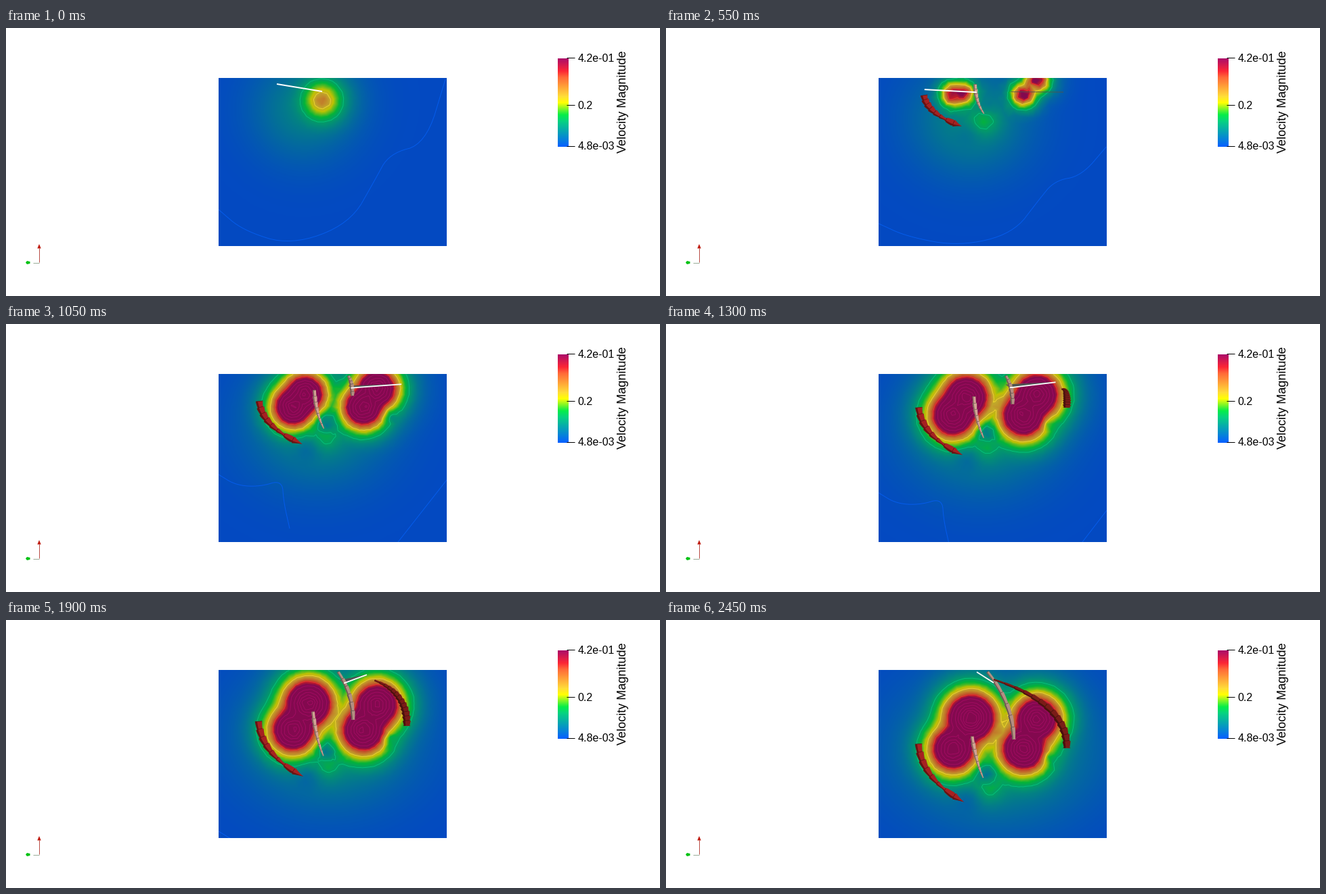
Recreate the animation shown at these times as a matplotlib script. Size 966 by 397 pixels, loop 2.5 s.

```python
import numpy as np
import matplotlib.pyplot as plt
from matplotlib.animation import FuncAnimation
from matplotlib.colors import LinearSegmentedColormap
from matplotlib.patches import Polygon, Rectangle
from matplotlib.tri import Triangulation

W, H, DPI = 966, 397, 100
TICK_MS, STEP_MS, TICKS = 50, 84.4, 50
PX = 72 / DPI
X0, X1, Y0, Y1 = 314, 651, 74, 323

STOPS = [
    (0, .02, .38, 1), (.29, .02, .83, .5), (.36, .02, .93, .29), (.5, 1, 1, .01),
    (.57, 1, .87, .22), (.79, 1, .41, .22), (.86, .99, .15, .21), (1, .68, .05, .41),
]


def rainbow(gain):
    colors = [(p, (r * gain, g * gain, b * gain)) for p, r, g, b in STOPS]
    return LinearSegmentedColormap.from_list("rainbow", colors, 512)


BRIGHT, DIM = rainbow(1), rainbow(.76)
LEVELS = .28 * np.arange(1, 13)

# The faint lowest contour: early shape at its start and end, and late shape.
LOW_START = np.array([(314, 269), (350, 300), (421, 322), (508, 290), (545, 225),
                      (566, 186), (620, 172), (649, 76)])
LOW_END = np.array([(314, 300), (360, 314), (440, 324), (515, 312), (553, 270),
                    (578, 246), (610, 243), (651, 226)])
LOW_LATE = np.array([(314, 250), (340, 266), (375, 268), (408, 258), (410, 290), (419, 330)])


def ease(u):
    u = np.clip(u, 0, 1)
    return u * u * (3 - 2 * u)


# A coarse jittered mesh gives the angular contours.
rng = np.random.default_rng(4)
mx, my = np.meshgrid(np.arange(X0 - 24, X1 + 25, 10.0), np.arange(Y0 - 24, Y1 + 25, 9.0))
mx[1::2] += 5
mx, my = (m.ravel() + rng.uniform(-2.5, 2.5, m.size) for m in (mx, my))
mesh = Triangulation(mx, my)
gx, gy = np.meshgrid(np.arange(X0, X1) + .5, np.arange(Y0, Y1) + .5)
corners = mesh.triangles[mesh.get_trifinder()(gx, gy)]
(xa, xb, xc), (ya, yb, yc) = (np.moveaxis(m[corners], -1, 0) for m in (mx, my))
area = (yb - yc) * (xa - xc) + (xc - xb) * (ya - yc)
wa = ((yb - yc) * (gx - xc) + (xc - xb) * (gy - yc)) / area
wb = ((yc - ya) * (gx - xc) + (xa - xc) * (gy - yc)) / area
weights = np.stack([wa, wb, 1 - wa - wb], -1)


def gauss(x, y, sx, sy):
    return np.exp(-((mx - x) / sx) ** 2 - ((my - y) / sy) ** 2)


def peak(x, y, strength, reach, core):
    dist = np.sqrt((mx - x) ** 2 + (my - y) ** 2 + core ** 2)
    return strength * np.exp(-dist / reach)


def velocity(k):
    """Four growing vortices, a trailing spot and a wide glow, all sinking."""
    grow = ease((k - 2) / 7)
    reach = np.clip(1.6 * k, 12, 22)
    low_y, spot_y = 75 + 4 * k, 107 + 4.8 * k
    vortices = [(436 + .5 * k, 95 + .06 * k ** 2, 2.7 + .05 * k), (424, low_y, 3.3),
                (548, 60 + 3 * k, 3.4), (528, low_y, 3.4)]
    parts = [peak(x, y, a * grow, reach, 6) for x, y, a in vortices]
    parts.append(peak(467 + .37 * k, spot_y, .68 + .7 * np.exp(-k / 2), 22, 15))
    parts.append((.18 + .003 * k) * gauss(440 + 1.7 * k, 120 + 2.5 * k, 75 + 2 * k, 75 + .9 * k))
    value = sum(p ** 4 for p in parts) ** .25
    for x, y, depth, size in ((473, spot_y - 18, .55, 13), (445, spot_y + 22, .4, 18),
                              (568, low_y + 14, .4, 10)):
        value *= 1 - depth * grow * gauss(x, y, size, size)
    return (value[corners] * weights).sum(-1)


def rounded(pts):
    for _ in range(3):
        a, b = pts[:-1], pts[1:]
        cut = np.stack([.75 * a + .25 * b, .25 * a + .75 * b], 1).reshape(-1, 2)
        pts = np.vstack([pts[:1], cut, pts[-1:]])
    return pts


fig = plt.figure(figsize=(W / DPI, H / DPI), dpi=DPI, facecolor="white")
ax = fig.add_axes([0, 0, 1, 1])
ax.axis("off")


def fit():
    ax.set(xlim=(0, W), ylim=(H, 0), aspect="auto")


def stroke(xs, ys, color, width=1.0, z=3):
    line, = ax.plot(xs, ys, color=color, lw=width * PX, zorder=z, solid_capstyle="butt")
    return line


def shape(pts, color, z=5):
    return ax.add_patch(Polygon(pts, closed=True, fc=color, ec="none", zorder=z))


def tube(start, bend, end, widths, color, ribs):
    """Segmented tube along a quadratic curve; widths are half widths."""
    t = np.linspace(0, 1, 120)
    u = t[:, None]
    start, bend, end = map(np.array, (start, bend, end))
    mid = (1 - u) ** 2 * start + 2 * u * (1 - u) * bend + u ** 2 * end
    tangent = np.gradient(mid, axis=0)
    normal = np.stack([-tangent[:, 1], tangent[:, 0]], 1)
    normal /= np.hypot(*normal.T)[:, None] + 1e-9
    half = np.interp(t, np.linspace(0, 1, len(widths)), widths)
    half = half * (1.15 - .35 * (ribs * t % 1))
    side = normal * half[:, None]
    dark = tuple(.6 * c for c in color)
    parts = [shape(np.vstack([mid + side, (mid - side)[::-1]]), color),
             shape(np.vstack([mid + side, (mid + .4 * side)[::-1]]), dark)]
    for i in np.arange(0, 119, 119 / ribs).astype(int):
        a, b = mid[i] - side[i], mid[i] + side[i]
        parts.append(stroke([a[0], b[0]], [a[1], b[1]], dark, .8, 6))
    return parts


def red_left(k):
    tail = (373 + 60 * np.exp(-k / 3), 90 + 1.2 * k + .07 * k ** 2)
    tip = (436 + .15 * k, 113 + 5.4 * k)
    bend = (tail[0] + 4, tail[1] + .6 * (tip[1] - tail[1]))
    return tube(tail, bend, tip, (4.5, 5, 5, 4.5, 3.5, 2, 5.5, 0), (.65, .13, .13), 8)


def red_right(k):
    age = k - 12.8
    start = (590 - 1.62 * age ** 1.5, 88 + 15 * np.exp(-age / 4))
    end = (592, 124 + 4.7 * (k - 15))
    bend = (594, (start[1] + end[1]) / 2 - 15)
    return tube(start, bend, end, (1, 2.5, 4, 5, 5.5, 5), (.48, .11, .09), 13)


def pink(k):
    top = (458 - .2 * k, 75 + .9 * k + .085 * k ** 2)
    end = (470 - .05 * k, 99 + 4.65 * k)
    bend = (457, (top[1] + end[1]) / 2 + 4)
    return tube(top, bend, end, (2, 3, 2.6, 2, 1.4, .8), (.82, .64, .58), 7)


def brown(k):
    end = (510 + .13 * k, 56.5 + 4.15 * k)
    bend = (512, (77 + end[1]) / 2 - 5)
    return tube((512 - .044 * k ** 2, 77), bend, end, (1.8, 2.8, 3.2, 3.2, 2.8), (.7, .56, .51), 6)


def left_blade(k):
    xs, ys = (380 + 20 * np.exp(-k / 2.5), 467 - 1.4 * k), (83 + 1.35 * k, 94 + .2 * k)
    return [stroke(xs, ys, "white", 2, 7)]


def right_blade(k):
    turn = max(0, (k - 9) / 20)
    xs = (510 - 26 * turn ** 2, 587 - 128 * turn ** 2)
    ys = (95 - 2 * turn, 95 - 18 * turn ** .6)
    thick = 1 + 5 * min(1, 4 * turn)
    parts = [shape([(xs[0] - thick, ys[0] - .8 * thick), (xs[0], ys[0]),
                    (xs[1], ys[1] + .5), (xs[1], ys[1] - .5)], (.3, .33, .32))]
    if turn > .05:
        parts.append(stroke(xs, ys, "white", 1.8, 7))
    return parts


# Each part with the steps between which it shows.
PARTS = [(left_blade, 0, 11), (right_blade, 6, 29), (red_left, 1, 29),
         (pink, 1, 29), (brown, 7, 29), (red_right, 13, 29)]


def low_contours(k):
    if k < 12:
        return [rounded(LOW_START + (LOW_END - LOW_START) * min(1, k / 9))]
    late = k - 15
    corner = np.array([(651, 276 + 15 * late), (615 + 12 * late, 323)])
    return [rounded(LOW_LATE + (0, 9 * late)), corner]


def label(x, y, text, size, **kw):
    ax.text(x, y, text, family="Liberation Sans", fontsize=size * PX, color="black", **kw)


# Colour bar
ax.imshow(np.linspace(1, 0, 131)[:, None], cmap=BRIGHT, extent=(815, 831, 176, 45))
for y, text in ((43.5, "4.2e-01"), (113.5, "0.2"), (174.5, "4.8e-03")):
    stroke([828, 840], [y, y], "black")
    label(844.5, y, text, 16, va="center_baseline")
label(916.5, 109.5, "Velocity Magnitude", 18, rotation=90, ha="center", va="baseline",
      rotation_mode="anchor")

# Orientation axes
stroke([48.5, 48.5], [347, 326], (.72, .3, .27))
shape([(46.3, 326.5), (49, 320), (51.7, 326.5)], (.75, .1, .06))
stroke([40, 49], [347.5, 347.5], (.6, .68, .6))
shape([(29, 347.5), (31, 345), (35.5, 346), (35.5, 349), (31, 350)], (.02, .76, .08))

plane = ax.imshow(np.zeros(gx.shape), cmap=DIM, vmin=0, vmax=1,
                  extent=(X0, X1, Y1, Y0), interpolation="nearest", zorder=1)
plane_clip = Rectangle((X0, Y0), X1 - X0, Y1 - Y0, transform=ax.transData)
fit()
moving = []


def draw(tick):
    while moving:
        moving.pop().remove()
    k = int(tick * TICK_MS / STEP_MS)
    value = velocity(k)
    plane.set_data(value)
    moving.append(ax.contour(gx, gy, value, levels=LEVELS, cmap=BRIGHT, vmin=0, vmax=1,
                             linewidths=.9 * PX, alpha=.75, zorder=2))
    for pts in low_contours(k):
        line = stroke(*pts.T, (.02, .36, .92), 1, 2)
        line.set_clip_path(plane_clip)
        moving.append(line)
    for part, first, last in PARTS:
        if first <= k <= last:
            moving.extend(part(k))
    fit()
    return []


anim = FuncAnimation(fig, draw, frames=TICKS, interval=TICK_MS, repeat=True,
                     repeat_delay=0, init_func=lambda: [], blit=False)
plt.show()
```
